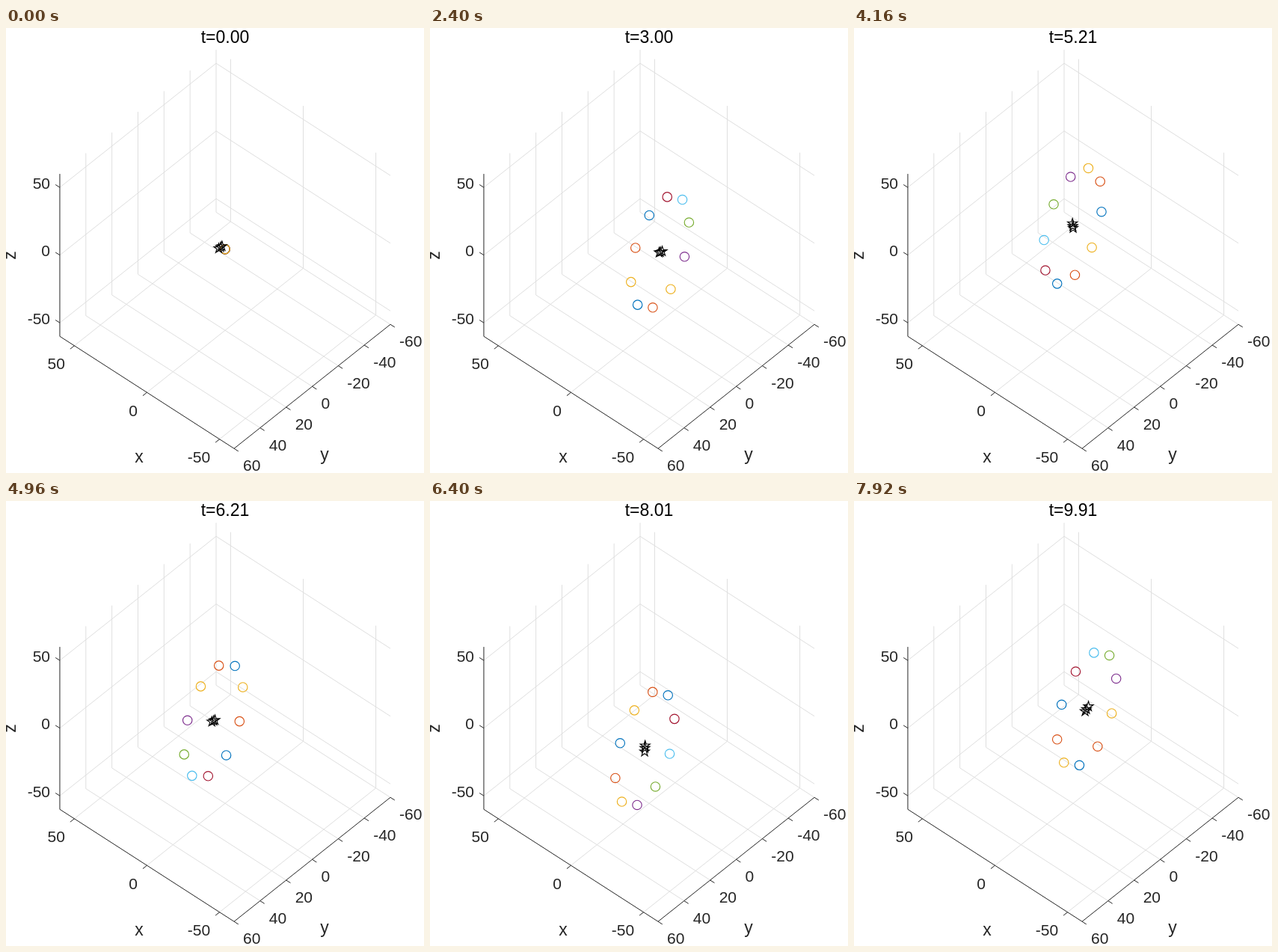
Recreate the animation shown at these times as an HTML page with a canvas. Size 559x595 px, loop 8000 ms.

```html
<!DOCTYPE html>
<html>
<head>
<meta charset="utf-8">
<style>
  html, body { margin: 0; width: 100%; height: 100%; overflow: hidden; background: #fff; }
  canvas { display: block; }
</style>
</head>
<body>
<canvas id="stage" width="559" height="595"></canvas>
<script>
const ctx = document.getElementById('stage').getContext('2d');
const { cos, sin, exp, PI } = Math;
const COLORS = ['#0072bd', '#d95319', '#edb120', '#7e2f8e', '#77ac30', '#4dbeee', '#a2142f'];
const INK = '#262626', GRID = '#dfdfdf';
const FRAMES = 100, FRAME_MS = 80, STEP = 10 / 99.9;
const ORIGIN = [293, 295.7];

// Projected cosine and sine parts of the orbits, in pixels
const CENTER = [[-16.2, 1], [-8.2, 35.8]];
const RING = [[26.5, -75.1], [-29.4, -18.85]];
const SPREAD = [[-2.3, 1.5], [-0.7, 4.5]];

const project = (x, y, z) => [
  ORIGIN[0] - 1.942 * x - 1.742 * y,
  ORIGIN[1] - 1.25 * x + 1.383 * y - 1.81 * z
];
const mix = ([p, q], c, s) => [p[0] * c + q[0] * s, p[1] * c + q[1] * s];
const add = (...points) => points.reduce((a, b) => [a[0] + b[0], a[1] + b[1]]);

function path(points, color, close) {
  ctx.beginPath();
  points.forEach(p => ctx.lineTo(...p));
  if (close) ctx.closePath();
  ctx.strokeStyle = color;
  ctx.stroke();
}

function text(str, x, y, align, size = 21, color = INK) {
  ctx.font = size + 'px "Liberation Sans", Arial, sans-serif';
  ctx.textAlign = align;
  ctx.fillStyle = color;
  ctx.fillText(str, x, y);
}

function tick([x, y], dx, dy) {
  path([[x, y], [x + dx, y + dy]], INK);
}

function drawAxes() {
  const ys = [60, 40, 20, 0, -20, -40, -60], tens = [50, 0, -50];
  ctx.lineWidth = 1;
  for (const y of ys.slice(1))
    path([project(60, y, 60), project(60, y, -60), project(-60, y, -60)], GRID);
  for (const v of tens) {
    path([project(v, -60, 60), project(v, -60, -60), project(v, 60, -60)], GRID);
    path([project(60, 60, v), project(60, -60, v), project(-60, -60, v)], GRID);
  }
  path([project(60, 60, 60), project(60, 60, -60), project(-60, 60, -60), project(-60, -60, -60)], INK);

  for (const v of tens) {
    const px = project(v, 60, -60), pz = project(60, 60, v);
    tick(px, -5.5, 4.4);
    text(v, px[0] - 12.5, px[1] + 31.5, 'right');
    tick(pz, -5.8, -3.7);
    text(v, 59, pz[1] + 1.5, 'right');
  }
  for (const y of ys) {
    const p = project(-60, y, -60);
    tick(p, 5.8, 3.7);
    text(y, p[0] + 12, p[1] + 30, 'left');
  }
  text('x', 178, 581, 'center', 23);
  text('y', 426, 578, 'center', 23);
  ctx.save();
  ctx.translate(13, 304);
  ctx.rotate(-PI / 2);
  text('z', 0, 0, 'center', 23);
  ctx.restore();
}

function drawAgents(t) {
  // Damped approach from rest at the origin to the rotating ring
  const decay = exp(-1.45 * t), w = 1.2;
  const b = decay * sin(w * t) / w;
  const a = decay * cos(w * t) + 1.45 * b;
  const c = cos(t) - a, s = sin(t) - b;
  const center = add(ORIGIN, mix(CENTER, c, s));
  for (let k = 0; k < 10; k++) {
    const u = k * PI / 5;
    const offset = mix(RING, c * cos(u) - s * sin(u), s * cos(u) + c * sin(u));
    const [x, y] = add(center, offset);
    ctx.beginPath();
    ctx.arc(x, y, 6.2, 0, 2 * PI);
    ctx.strokeStyle = COLORS[k % 7];
    ctx.stroke();
  }
}

function drawStars(t) {
  const lag = exp(-t);
  const center = add(ORIGIN, mix(CENTER, cos(t), sin(t)), [10 * lag, -3.5 * lag]);
  const spread = mix(SPREAD, cos(t), sin(t));
  for (const k of [1, -0.1, -0.9]) {
    const [x, y] = add(center, [k * spread[0], k * spread[1]]);
    const points = Array.from({ length: 10 }, (_, i) => {
      const r = i % 2 ? 2.6 : 6.8, u = i * PI / 5;
      return [x + r * sin(u), y - r * cos(u)];
    });
    path(points, '#000', true);
  }
}

function draw() {
  const t = Math.floor(performance.now() / FRAME_MS) % FRAMES * STEP;
  ctx.fillStyle = '#fff';
  ctx.fillRect(0, 0, 559, 595);
  drawAxes();
  ctx.lineWidth = 1.15;
  drawAgents(t);
  drawStars(t);
  text('t=' + t.toFixed(2), 293, 20, 'center', 23, '#000');
  requestAnimationFrame(draw);
}
draw();
</script>
</body>
</html>
```
